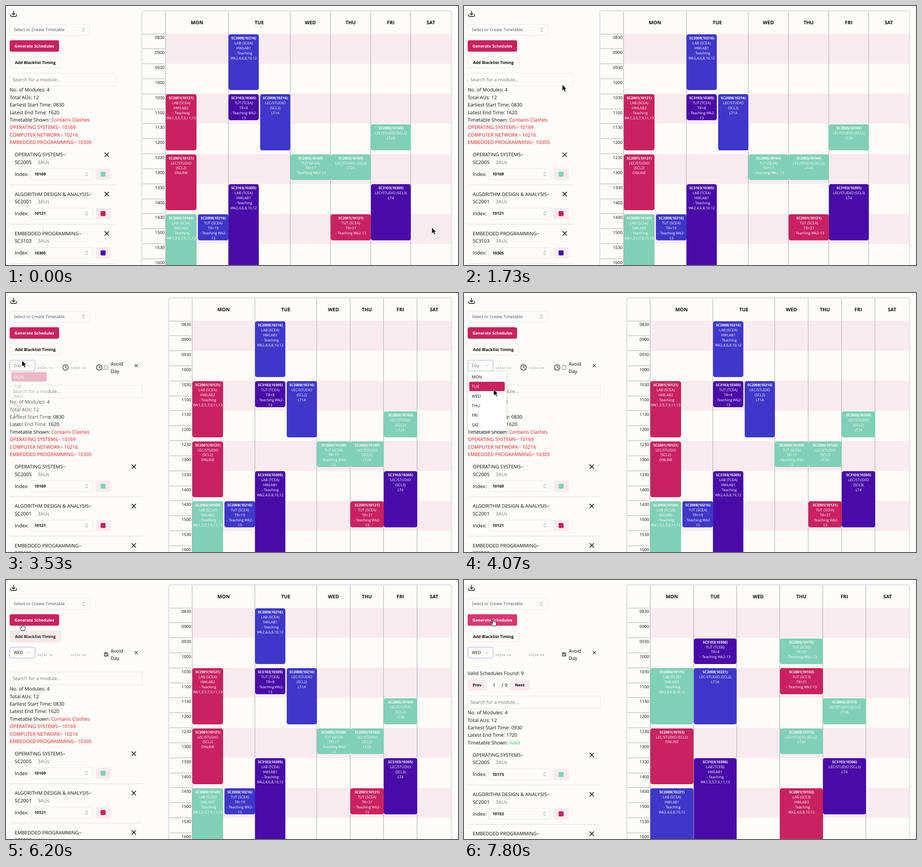
These frames come from a looping animation (987 px wide and 567 px high, 8 s). An HTML page:

```html
<!DOCTYPE html>
<html lang="en">
<head>
<meta charset="utf-8">
<title>Timetable planner</title>
<style>
  html, body { margin: 0; width: 100%; height: 100%; overflow: hidden; background: #fdfcf8; }
  svg { display: block; width: 987px; height: 567px; font-family: "Open Sans", "Noto Sans", sans-serif; }
  text { white-space: pre; text-rendering: geometricPrecision; }
</style>
</head>
<body>
<svg id="stage" viewBox="0 0 987 567"></svg>
<script>
const LOOP = 8000;
const INK = '#0e0b0c', PAPER = '#fdfcf8', PINK = '#f8ebf0', ROSE = '#c9225f', EDGE = '#e5e5ea', GREY = '#777980';
const COLORS = { SC2001: ROSE, SC2005: '#7fd0b6', SC2008: '#3f37c9', SC3103: '#480ca8' };
const ROW = 32.83, TOP = 61;

// Drawing helpers
const text = (x, y, s, { size = 10.6, fill = INK, weight = 400, anchor = 'start', extra = '' } = {}) =>
  `<text x="${x}" y="${y + size * .355}" font-size="${size}" fill="${fill}" font-weight="${weight}" text-anchor="${anchor}" ${extra}>${s}</text>`;
const rect = (x, y, w, h, fill, r = 0, stroke = 'none', extra = '') =>
  `<rect x="${x}" y="${y}" width="${w}" height="${h}" rx="${r}" fill="${fill}" stroke="${stroke}" ${extra}/>`;
const path = (d, stroke = INK, width = 1, x = 0, y = 0, extra = '') =>
  `<path d="${d}" transform="translate(${x} ${y})" fill="none" stroke="${stroke}" stroke-width="${width}" stroke-linecap="round" stroke-linejoin="round" ${extra}/>`;
const group = (id, body) => `<g id="${id}">${body}</g>`;
const cross = (x, y, r, w) => path(`M${-r} ${-r}L${r} ${r}M${r} ${-r}L${-r} ${r}`, INK, w, x, y);
const sorter = (x, y) => path('M-2.4-1.5L0-3.9L2.4-1.5M-2.4 1.5L0 3.9L2.4 1.5', '#66676c', .9, x, y);
const clock = x => `<circle cx="${x}" cy="163" r="6" fill="none" stroke="${INK}" stroke-width="1.1"/>` +
  path('M0-3.6V0L2.4 1.4', INK, 1.1, x, 163);
const label = (x, y, s, fill = INK) => text(x, y, s, { size: 8.8, weight: 700, anchor: 'middle', fill });

// Calendar
const LEC = 'LEC/STUDIO (SCL', TEACH = '- Teaching Wk2-13';
const EVEN = '- Teaching|Wk2,4,6,8,10,12', ODD = '- Teaching|Wk1,3,5,7,9,11,13';

// day, half (0 full, 1 left, 2 right), slot, hours, module, index, details
const clashing = [
  [0, 1, 4, 2, 'SC2001', 10121, 'LAB (SCEA)|HWLAB2|' + ODD],
  [0, 1, 8, 2, 'SC2001', 10121, LEC + '2)|ONLINE'],
  [0, 1, 12, 4, 'SC2005', 10169, 'LAB (SCSA)|SWLAB3|' + ODD],
  [0, 2, 12, 1, 'SC2008', 10216, 'TUT (SCEA)|TR+19|' + TEACH],
  [1, 1, 0, 2, 'SC2008', 10216, 'LAB (SCEA)|HWLAB1|' + EVEN],
  [1, 1, 4, 1, 'SC3103', 10305, 'TUT (TCEA)|TR+8|' + TEACH],
  [1, 1, 10, 4, 'SC3103', 10305, 'LAB (TCEA)|HWLAB1|' + EVEN],
  [1, 2, 4, 2, 'SC2008', 10216, LEC + '2)|LT1A'],
  [2, 0, 8, 1, 'SC2005', 10169, 'TUT (SCSA)|TR+17|' + TEACH],
  [3, 0, 8, 1, 'SC2005', 10169, LEC + '2)|LT2A'],
  [3, 0, 12, 1, 'SC2001', 10121, 'TUT (SCEA)|TR+37|' + TEACH],
  [4, 0, 6, 1, 'SC2005', 10169, LEC + '2)|LT2A'],
  [4, 0, 10, 2, 'SC3103', 10305, LEC + '3)|LT4']
];
const valid = [
  [0, 0, 4, 2, 'SC2005', 10173, 'LAB (SCSE)|SWLAB3|' + EVEN],
  [0, 0, 8, 2, 'SC2001', 10153, LEC + '2)|ONLINE'],
  [0, 0, 12, 4, 'SC2008', 10221, 'LAB (SCSA)|HWLAB1|' + EVEN],
  [1, 0, 2, 1, 'SC3103', 10306, 'TUT (TCEB)|TR+4|' + TEACH],
  [1, 0, 4, 2, 'SC2008', 10221, LEC + '2)|LT1A'],
  [1, 0, 10, 4, 'SC3103', 10306, 'LAB (TCEB)|HWLAB1|' + ODD],
  [3, 0, 2, 1, 'SC2005', 10173, 'TUT (SCSE)|TR+37|' + TEACH],
  [3, 0, 4, 1, 'SC2001', 10153, 'TUT (SCE3)|TR+21|' + TEACH],
  [3, 0, 8, 1, 'SC2005', 10173, LEC + '2)|LT2A'],
  [3, 0, 12, 4, 'SC2001', 10153, 'LAB (SCE3)|HWLAB3|' + EVEN],
  [4, 0, 6, 1, 'SC2005', 10173, LEC + '2)|LT2A'],
  [4, 0, 10, 2, 'SC3103', 10306, LEC + '3)|LT4']
];

function eventBlock(cols, [day, half, slot, hours, module, index, details]) {
  let x0 = Math.floor(cols[day]) + 1, x1 = Math.round(cols[day + 1]);
  const mid = (x0 + x1) / 2;
  if (half === 1) x1 = Math.round(mid - 1.5);
  if (half === 2) x0 = Math.round(mid + 1.5);
  const y = TOP + 1 + slot * ROW, top = Math.round(y);
  const h = Math.round(y + hours * 65.66 - 9) - top;
  if (x1 - x0 < 76) details = details.replace('O (', 'O|(').replace('Wk2-13', 'Wk2-|13');
  const lines = [`${module}(${index})`, ...details.split('|')];
  return rect(x0, top, x1 - x0, h, COLORS[module], 4.5) + lines.map((s, i) =>
    text((x0 + x1) / 2, y + 8.1 + i * 10.95, s, { size: i ? 7.95 : 7.8, fill: '#fff', weight: i ? 500 : 700, anchor: 'middle' })).join('');
}

function calendar(left, cols, events) {
  let out = '';
  for (let i = 0; i < 4; i++) out += rect(cols[0], Math.round(TOP + i * 4 * ROW), 972 - cols[0], 65.5, PINK);
  for (let i = 0; i < 16; i++) {
    const y = TOP + i * ROW, mins = 510 + i * 30;
    const time = String(Math.floor(mins / 60)).padStart(2, '0') + String(mins % 60).padStart(2, '0');
    out += rect(left + 1, Math.floor(y), cols[0] - left - 3, 1, '#a9adb6');
    out += text(cols[0] - 2.2, y + 8.2, time, { size: 9.2, anchor: 'end' });
  }
  ['MON', 'TUE', 'WED', 'THU', 'FRI', 'SAT'].forEach((day, i) => {
    out += rect(Math.floor(cols[i]), 12, 1, 560, '#a3a8b2');
    out += text((cols[i] + cols[i + 1]) / 2, 36.5, day, { weight: 700, anchor: 'middle' });
  });
  out += events.map(e => eventBlock(cols, e)).join('');
  return out + rect(left, 10.5, 973 - left, 600, 'none', 4, '#e4e5eb', 'stroke-width="3"');
}

// Sidebar
function moduleRow(y, right, title, code, index) {
  return text(19, y, title) + cross(right - 19.5, y - .2, 4.3, 1.5) +
    text(19, y + 16.4, code) + text(69, y + 16.4, '3AUs', { fill: GREY }) +
    text(19, y + 42.4, 'Index:') + rect(53.5, y + 30.5, 136, 24, PAPER, 4, EDGE) +
    text(62, y + 42.4, index, { size: 8.8, weight: 700 }) + sorter(176, y + 42.4) +
    rect(195.5, y + 30, 33.5, 25, PINK, 4) + rect(206.5, y + 37, 11, 11, COLORS[code], 2) +
    rect(8, y + 65, right - 8, 1.4, '#e3e4ea');
}

function sidebar(y, right, start, end, status, statusColor, clashes, indices) {
  const rows = ['No. of Modules: 4', 'Total AUs: 12', 'Earliest Start Time: ' + start, 'Latest End Time: ' + end,
    `Timetable Shown: <tspan fill="${statusColor}">${status}</tspan>`];
  let out = rect(8.5, y - 14, right - 9, 28, PAPER, 1, EDGE) +
    text(14, y, 'Search for a module...', { size: 10.35, fill: GREY });
  rows.forEach((s, i) => out += text(8, y + 22.7 + i * 16.4, s));
  clashes.forEach((s, i) => out += text(8, y + 104.7 + i * 16.4, s, { fill: '#e3141f' }));
  const base = y + 115.5 + clashes.length * 16.4;
  [['OPERATING SYSTEMS~', 'SC2005'], ['ALGORITHM DESIGN &amp; ANALYSIS~', 'SC2001'], ['EMBEDDED PROGRAMMING~', 'SC3103']]
    .forEach(([title, code], i) => out += moduleRow(base + i * 86.2, right, title, code, indices[i]));
  return out;
}

const clashes = ['OPERATING SYSTEMS~ 10169', 'COMPUTER NETWORK~ 10216', 'EMBEDDED PROGRAMMING~ 10305'];
const clashSide = (y, right) =>
  sidebar(y, right, '0830', '1620', 'Contains Clashes', '#e3141f', clashes, [10169, 10121, 10305]);

const topBar =
  path('M0-6V2.4M-3.3-.8L0 2.5L3.3-.8M-6.2 1.5V4.2Q-6.2 5.7-4.7 5.7H4.7Q6.2 5.7 6.2 4.2V1.5', INK, 1.4, 16.5, 17) +
  rect(8.5, 40, 174, 24, PAPER, 4, EDGE) +
  text(17, 52, 'Select or Create Timetable', { size: 9.1, fill: '#465269' }) + sorter(169, 52) +
  rect(8, 75, 108, 25, ROSE, 4) +
  group('genHover', rect(8, 75, 108, 25, '#dc3570', 4)) +
  label(62, 87.8, 'Generate Schedules', '#fff') +
  rect(8.5, 111.5, 111.5, 24, PAPER, 4, EDGE) + label(64, 123.4, 'Add Blacklist Timing') +
  group('addHover', rect(8.5, 111.3, 111.5, 24.3, ROSE, 4) + label(64, 123.4, 'Add Blacklist Timing', '#fff'));

const dashes = x => text(x, 163, '--:-- --', { extra: 'letter-spacing="1"' });
const blacklistRow =
  rect(8.5, 147, 55, 24, PAPER, 4, EDGE, 'id="dayBox"') +
  group('dayEmpty', text(17, 159, 'Day', { size: 9.1, fill: GREY })) +
  group('dayChosen', text(17, 159, 'WED', { size: 9.1 })) +
  path('M-2.7-1.3L0 1.4L2.7-1.3', '#9a9ba0', .9, 50, 159) +
  dashes(69) + dashes(142) +
  group('unchecked', clock(130) + clock(203.5) + rect(214.5, 158.8, 8.2, 8.2, '#fff', 1.5, '#767676')) +
  group('checked', rect(214, 158.3, 9.2, 9.2, '#6c6c70', 1.5) + path('M-2.7 0L-.8 2L2.8-2.2', '#fff', 1.3, 218.6, 163)) +
  text(228.5, 155, 'Avoid') + text(228.5, 171.4, 'Day') + cross(284.5, 159, 2.8, 1.1);

const results =
  text(8, 204, 'Valid Schedules Found: 9') +
  rect(8, 218, 41.5, 24.5, PINK, 4) + label(28.7, 230.2, 'Prev') +
  text(62.8, 230.2, '1') + text(82, 230.2, '/ 9') +
  rect(100, 218, 43.5, 24.5, PINK, 4) + label(121.7, 230.2, 'Next');

const ITEM = 21;
const menu = rect(8.5, 171.5, 84.5, 130, '#fff', 4, EDGE, 'style="filter:drop-shadow(0 2px 3px #0002)"') +
  rect(11.5, 173.2, 77.5, 20.5, ROSE, 3, 'none', 'id="pick"') +
  ['MON', 'TUE', 'WED', 'THU', 'FRI', 'SAT'].map((d, i) =>
    text(17, 183.5 + i * ITEM, d, { size: 9.1, extra: 'class="item"' })).join('');

const narrowCols = [406.5, 543.5, 678.5, 751.5, 824.5, 897.5, 972];
const evenCols = [406.5, 501.3, 595.4, 689.5, 783.6, 877.7, 972];

const stage = document.getElementById('stage');
stage.innerHTML =
  group('before', clashSide(161, 239.5) + calendar(296.5, [348.5, 485.5, 620.5, 708.5, 796.5, 883.5, 972], clashing)) +
  group('adding', clashSide(215.7, 298.5) + calendar(355.5, narrowCols, clashing)) +
  group('after', results + sidebar(267.7, 298.5, '0930', '1720', 'Valid', '#22c55e', [], [10173, 10153, 10306]) +
    calendar(355.5, evenCols, valid)) +
  topBar + group('blacklist', blacklistRow) + group('menu', menu) +
  group('arrow', '<path d="M0 0V13L3 10.3L5.2 15.3L7.5 14.3L5.4 9.4H9.3Z" fill="#000" stroke="#fff" stroke-width=".6"/>') +
  group('hand', '<path d="M-1.1 8.5V1.1a1.1 1.1 0 0 1 2.2 0V5.2q1.9-.6 2 .5q1.7-.5 1.9 .6q1.6-.3 1.6 1V11q0 2-1.2 3.8H-1.4q-.6-1.6-2.6-4.3q-1.1-1.7 0-2.2q1-.3 1.9 1.4Z" fill="#fff" stroke="#111" stroke-width="1"/>');

// Motion: time followed by values, interpolated linearly
const OPEN = 2870, MENU = 3480, CHOOSE = 4530, CHECK = 5230, DONE = 7200;
const pointer = [[270, 930, 485], [330, 929, 477], [670, 929, 477], [1130, 434, 305], [1470, 261, 190], [1530, 261, 190],
  [2330, 77, 120], [OPEN, 77, 120], [3250, 35, 148], [3730, 35, 148], [4130, 70, 222], [CHOOSE, 70, 222], [4930, 220, 163],
  [CHECK, 220, 163], [5550, 130, 232], [5930, 33, 143], [6000, 33, 143], [6200, 35, 96], [6730, 64, 86]];
const addFade = [[2290, 0], [2600, 1], [OPEN, 1], [3150, 0], [6030, 0], [6090, .3], [6180, .1], [6300, 0]];
const genFade = [[6210, 0], [6520, 1]];
const menuFade = [[MENU, 0], [3640, 1], [CHOOSE, 1], [4620, 0]];

function track(keys, t) {
  const i = keys.findIndex(k => k[0] > t);
  if (i === 0) return keys[0].slice(1);
  if (i < 0) return keys[keys.length - 1].slice(1);
  const a = keys[i - 1], b = keys[i], p = (t - a[0]) / (b[0] - a[0]);
  return a.slice(1).map((v, n) => v + (b[n + 1] - v) * p);
}

const el = id => document.getElementById(id);
const show = (id, on) => el(id).style.display = on ? '' : 'none';
const items = document.querySelectorAll('.item');

function render(t) {
  show('before', t < OPEN);
  show('adding', t >= OPEN && t < DONE);
  show('after', t >= DONE);
  show('blacklist', t >= OPEN);
  show('dayEmpty', t < CHOOSE);
  show('dayChosen', t >= CHOOSE);
  show('unchecked', t < CHECK);
  show('checked', t >= CHECK);
  el('dayBox').setAttribute('stroke', t >= MENU ? '#aaa4ea' : EDGE);
  el('addHover').setAttribute('opacity', track(addFade, t)[0]);
  el('genHover').setAttribute('opacity', track(genFade, t)[0]);

  const [x, y] = track(pointer, t);
  const [open] = track(menuFade, t);
  const picked = t >= CHOOSE ? 2 : Math.max(0, Math.floor((y - 173) / ITEM));
  const zoom = .95 + .05 * open;
  show('menu', open > 0);
  el('menu').setAttribute('opacity', open);
  el('menu').setAttribute('transform', `translate(8 172) scale(${t < CHOOSE ? 1 : zoom}) translate(-8 -172)`);
  el('pick').setAttribute('y', 173.2 + picked * ITEM);
  items.forEach((item, i) => item.setAttribute('fill', i === picked ? '#fff' : INK));

  const onButton = x > 8 && ((x < 115.5 && y > 75 && y < 100) || (x < 120 && y > 111 && y < 135.5));
  show('arrow', !onButton);
  show('hand', onButton);
  el(onButton ? 'hand' : 'arrow').setAttribute('transform', `translate(${x} ${y})`);
}

const began = performance.now();
function tick() {
  render((performance.now() - began) % LOOP);
  requestAnimationFrame(tick);
}
tick();
</script>
</body>
</html>
```
